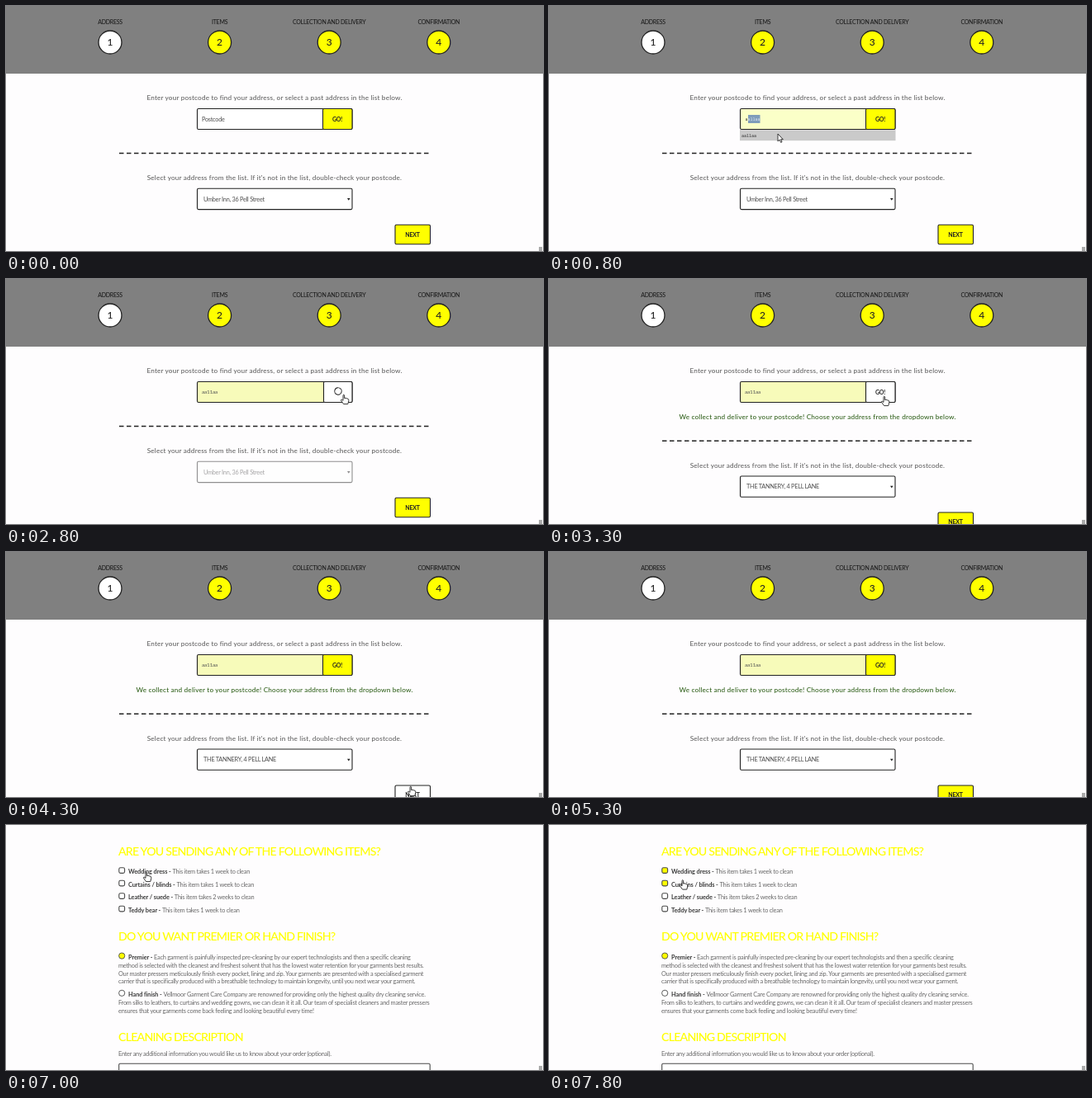
Recreate the animation shown at these times as an HTML page. Size 650 px wide and 297 px high, loop 8000 ms.

```html
<!DOCTYPE html>
<html lang="en">
<head>
<meta charset="utf-8">
<title>Booking form</title>
<style>
html, body { margin: 0; width: 100%; height: 100%; overflow: hidden; background: #fefdfe; }
svg { display: block; width: 650px; height: 297px; font-family: Lato, "Open Sans", sans-serif; }
.mid { text-anchor: middle; }
.tab { font-size: 7px; letter-spacing: -.25px; font-weight: 500; fill: #1c1c1c; }
.num { font-size: 12px; font-weight: 500; fill: #222; }
.lead { font-size: 8.2px; letter-spacing: .18px; fill: #555; }
.ok { fill: #31611c; font-weight: 500; }
.field { font-size: 7.3px; letter-spacing: -.25px; fill: #4c4c4c; }
.code { font-size: 6.5px; letter-spacing: -.25px; fill: #555; }
.mono { font: 5px "DejaVu Sans Mono", monospace; fill: #333; }
.btn { font-size: 7px; letter-spacing: -.25px; font-weight: 700; fill: #222; }
.head { font-size: 14.2px; letter-spacing: -.8px; font-weight: 500; fill: #ff0; }
.body { font-size: 7.4px; letter-spacing: -.25px; fill: #686868; }
.body tspan { letter-spacing: -.1px; font-weight: 700; fill: #3c3c3c; }
</style>
</head>
<body>
<svg id="stage" viewBox="0 0 650 297"></svg>
<script>
const INK = '#222', SOFT = '#4a4a4a', YELLOW = '#ff0', PAGE = '#fefdfe', LOOP = 8000;

// Each step: start time, pointer [shape, x, y], and the page state that changes there.
const steps = [
  { t: 0, view: 'form', value: '' },
  { t: 300, cursor: ['arrow', 300, 140] },
  { t: 500, value: 'a' },
  { t: 800, hint: true, cursor: ['arrow', 277, 155] },
  { t: 1000, hint: false, value: 'aa11aa', filled: true },
  { t: 1300, cursor: ['hand', 408, 140], hover: 'go' },
  { t: 1500, busy: true, fade: .7 },
  { t: 1800, fade: .5 },
  { t: 2000 }, { t: 2300 }, { t: 2500 }, { t: 2800 }, { t: 3000 },
  { t: 3300, busy: false, fade: 1, found: true, cursor: ['hand', 405, 142] },
  { t: 3800, hover: '', cursor: ['arrow', 440, 215] },
  { t: 4000, cursor: ['arrow', 488, 275] },
  { t: 4300, hover: 'next', cursor: ['hand', 489, 284] },
  { t: 4800, hover: '', cursor: ['arrow', 486, 280] },
  { t: 5000, cursor: ['arrow', 440, 64] },
  { t: 5300, cursor: null },
  { t: 5800, view: 'items', checked: 0, square: true },
  { t: 6000, square: false },
  { t: 6300, cursor: ['arrow', 590, 244] },
  { t: 6500, cursor: ['arrow', 259, 77] },
  { t: 6800, cursor: ['arrow', 210, 66] },
  { t: 7000, cursor: ['hand', 169, 57] },
  { t: 7300, checked: 1, cursor: ['hand', 142, 54] },
  { t: 7500, checked: 2, cursor: ['hand', 150, 67] },
  { t: 7800, cursor: ['hand', 161, 66.5] }
];
for (let i = 1; i < steps.length; i++) steps[i] = { ...steps[i - 1], ...steps[i] };

const text = (x, y, cls, s) => `<text x="${x}" y="${y}" class="${cls}">${s}</text>`;
const box = (x, y, w, h, fill, stroke = INK, r = 1.5) =>
  `<rect x="${x}" y="${y}" width="${w}" height="${h}" rx="${r}" fill="${fill}" stroke="${stroke}" stroke-width="1.1"/>`;
const ring = (x, y, r, fill, width = 1, stroke = INK) =>
  `<circle cx="${x}" cy="${y}" r="${r}" fill="${fill}" stroke="${stroke}" stroke-width="${width}"/>`;

const shapes = {
  arrow: 'M0 0V9L2.1 7.2 3.6 10.4 5 9.8 3.6 6.7H6.3Z',
  hand: 'M0 .8Q.8-.6 1.6.8V4.6L3 4.2 4.4 4.8 6 5.2Q7 5.6 6.8 7.6L5.8 11.6H.6L-2.6 7.2Q-2.6 5.8-1.2 6.4L0 7.4Z'
};
const pointer = c => c ? `<path d="${shapes[c[0]]}" transform="translate(${c[1]} ${c[2]})"
  fill="#fff" stroke="${INK}" stroke-width=".9" stroke-linejoin="round"/>` : '';

function header() {
  const tabs = ['ADDRESS', 'ITEMS', 'COLLECTION AND DELIVERY', 'CONFIRMATION'];
  return '<rect width="650" height="82" fill="#808080"/>' + tabs.map((name, i) => {
    const x = 126 + i * 132.6;
    return text(x, 21.8, 'tab mid', name) + ring(x, 44, 14, i ? YELLOW : '#fff', 1.3) +
      text(x, 48.3, 'num mid', i + 1);
  }).join('');
}

function postcode(s) {
  const split = s.busy ? 384.5 : 383.5;
  const tint = s.hint ? '#fbffc8' : s.filled ? '#f7fbba' : '#fff';
  let out = box(231.5, 124.5, 187.5, 25, tint) +
    box(split, 124.5, 419 - split, 25, s.hover === 'go' ? '#fff' : YELLOW);
  if (s.busy) {
    out += `<circle cx="402" cy="136" r="4.2" fill="none" stroke="${INK}" stroke-width="1"
      stroke-dasharray="25.2 1.2" transform="rotate(${s.t * .36} 402 136)"/>`;
  } else out += text(401, 139.5, 'btn mid', 'GO!');

  if (s.hint) {
    out += '<rect x="241" y="132" width="14.5" height="10" fill="#7f9cba"/>' +
      text(237.5, 139, 'mono', 'a<tspan fill="#dfe8f2">a11aa</tspan>') +
      '<rect x="231" y="150.2" width="188.5" height="13" fill="#cacaca"/>' +
      text(233, 158.7, 'mono', 'aa11aa');
  } else out += s.value ? text(237, 139.3, 'code', s.value) : text(237, 139.5, 'field', 'Postcode');
  return out;
}

function form(s) {
  const address = s.found ? 'THE TANNERY, 4 PELL LANE' : 'Umber Inn, 36 Pell Street';
  return header() +
    text(325, 114, 'lead mid', 'Enter your postcode to find your address, or select a past address in the list below.') +
    (s.found ? text(325, 170, 'lead ok mid', 'We collect and deliver to your postcode! Choose your address from the dropdown below.') : '') +
    `<g transform="translate(0 ${s.found ? 17.7 : 0})">
      <path d="M137 178.5H513" stroke="${INK}" stroke-width="1.6" stroke-dasharray="5.5 3.5"/>` +
    text(325, 211.3, 'lead mid', "Select your address from the list. If it's not in the list, double-check your postcode.") +
    `<g opacity="${s.fade ?? 1}">` + box(231.5, 221.3, 187.5, 25.3, '#fff') +
    text(239, 236.7, 'field', address) + `<path d="M413 233h3.6l-1.8 2.8z" fill="${INK}"/></g>` +
    box(471, 265.3, 42.5, 23.5, s.hover === 'next' ? '#fff' : YELLOW) +
    text(492, 279.7, 'btn mid', 'NEXT') + '</g>' + postcode(s);
}

function items(s) {
  const week = n => `This item takes ${n} week${n > 1 ? 's' : ''} to clean`;
  const rows = [['Wedding dress', 1], ['Curtains / blinds', 1], ['Leather / suede', 2], ['Teddy bear', 1]];
  const lines = (y, title, list) => list.map((line, i) =>
    text(i ? 136 : 148, y + i * 9.9, 'body', i ? line : `<tspan>${title} - </tspan>${line}`)).join('');
  const tick = (y, on) => box(136.8, y, 6.8, 6.6, on ? YELLOW : '#fff', SOFT, 1.8);
  const radio = (y, on) => ring(140.2, y, 3.6, on ? YELLOW : '#fff', .9, SOFT);

  return text(136, 36.7, 'head', 'ARE YOU SENDING ANY OF THE FOLLOWING ITEMS?') +
    rows.map(([name, n], i) => {
      const y = 59 + i * 15.5;
      return tick(y - 7.2, i < s.checked) + lines(y, name, [week(n)]);
    }).join('') +
    text(136, 139.7, 'head', 'DO YOU WANT PREMIER OR HAND FINISH?') +
    (s.square ? tick(155, true) : radio(158.6, true)) +
    lines(162.7, 'Premier', [
      'Each garment is painfully inspected pre-cleaning by our expert technologists and then a specific cleaning',
      'method is selected with the cleanest and freshest solvent that has the lowest water retention for your garments best results.',
      'Our master pressers meticulously finish every pocket, lining and zip. Your garments are presented with a specialised garment',
      'carrier that is specifically produced with a breathable technology to maintain longevity, until you next wear your garment.'
    ]) +
    radio(203.8, false) +
    lines(207.7, 'Hand finish', [
      'Vellmoor Garment Care Company are renowned for providing only the highest quality dry cleaning service.',
      'From silks to leathers, to curtains and wedding gowns, we can clean it it all. Our team of specialist cleaners and master pressers',
      'ensures that your garments come back feeling and looking beautiful every time!'
    ]) +
    text(136, 261.7, 'head', 'CLEANING DESCRIPTION') +
    text(136, 279.5, 'body', 'Enter any additional information you would like us to know about your order (optional).') +
    box(136.7, 289.3, 376.5, 40, '#fff', SOFT);
}

const stage = document.getElementById('stage');
let shown = null;
function draw(now) {
  const t = now % LOOP;
  const s = steps.findLast(step => step.t <= t) || steps[0];
  if (s !== shown) {
    shown = s;
    stage.innerHTML = `<rect width="650" height="297" fill="${PAGE}"/>` +
      (s.view === 'form' ? form(s) : items(s)) +
      '<rect x="645" y="292" width="4" height="5" fill="#aaa"/>' + pointer(s.cursor);
  }
}
const start = performance.now();
function loop() {
  draw(performance.now() - start);
  requestAnimationFrame(loop);
}
loop();
</script>
</body>
</html>
```
